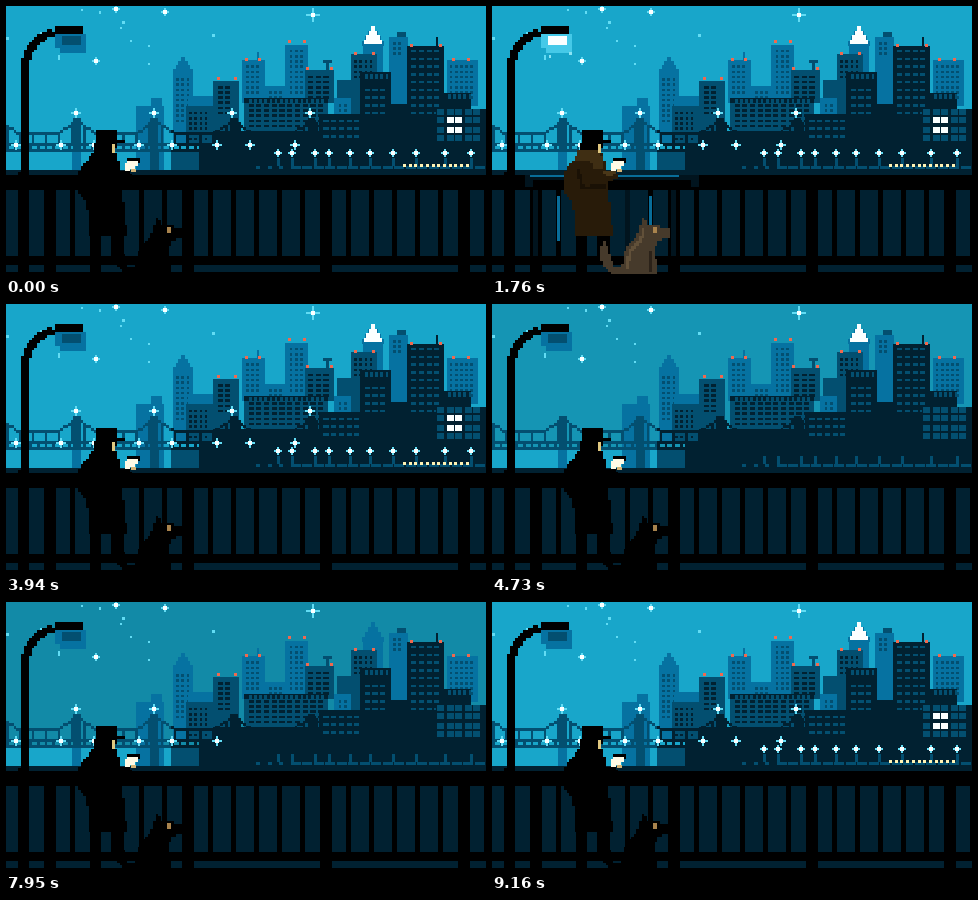
These frames come from a looping animation (480x270 px, 9320 ms). An HTML page:

```html
<!DOCTYPE html>
<html lang="en">
<head>
<meta charset="utf-8">
<title>Night city</title>
<style>
html, body { margin: 0; width: 100%; height: 100%; overflow: hidden; background: #000; }
svg { display: block; width: 100vw; height: 100vh; }
</style>
</head>
<body>
<svg id="stage" viewBox="0 0 480 270" shape-rendering="crispEdges"></svg>
<script>
const LOOP = 9320, PX = 2.58;
const SKY = ['#18a6ca', '#1595b4', '#128aa7'];
const WATER = '#18a6ca', FAR = '#0672a1', MID = '#034f70', NEAR = '#012131', INK = '#000';
const WHITE = '#fbffff', CREAM = '#fff3b4', GOLD = '#e3cf80', CYAN = '#62dcf4', RED = '#f0694f';

const stage = document.getElementById('stage');
const lights = [];
let seed = 11;
const random = () => (seed = seed * 16807 % 2147483647) / 2147483647;
const range = (n, f) => Array.from({ length: n }, (_, i) => f(i));
const snap = v => Math.round(v / PX) * PX;

function add(tag, attrs, parent = stage) {
  const el = document.createElementNS('http://www.w3.org/2000/svg', tag);
  for (const k in attrs) el.setAttribute(k, attrs[k]);
  parent.appendChild(el);
  return el;
}
const group = () => add('g', {});
const rect = (fill, x, y, width, height, parent) =>
  add('rect', { fill, x, y, width, height }, parent);

// Fills a polygon in rows of coarse pixels.
function blob(fill, points, parent) {
  const pts = points.split(' ').map(p => p.split(',').map(Number));
  let d = '';
  for (let y = 0; y < 270; y += PX) {
    const mid = y + PX / 2, cuts = [];
    pts.forEach(([x1, y1], i) => {
      const [x2, y2] = pts[(i + 1) % pts.length];
      if (y1 > mid !== y2 > mid) cuts.push(snap(x1 + (mid - y1) / (y2 - y1) * (x2 - x1)));
    });
    cuts.sort((a, b) => a - b);
    for (let i = 0; i + 1 < cuts.length; i += 2) d += `M${cuts[i]} ${y}H${cuts[i + 1]}v${PX}H${cuts[i]}Z`;
  }
  return add('path', { fill, d }, parent);
}

// A part that goes dark at "off" and comes back at "on".
function light(on, off) {
  const el = group();
  lights.push({ el, on, off });
  return el;
}

function cross(x, y, r, parent) {
  rect(CYAN, x - r, y - 1, 2 * r, 2, parent);
  rect(CYAN, x - 1, y - r, 2, 2 * r, parent);
  rect(WHITE, x - 2, y - 2, 4, 4, parent);
}

// Sky
const sky = rect(SKY[0], 0, 0, 480, 165);
range(12, () => rect(CYAN, snap(random() * 240), snap(random() * 70), PX, PX));
cross(110, 3, 4);
cross(159, 6, 4);
cross(90, 55, 4);
cross(307, 9, 7);
rect(WATER, 0, 146, 193, 18);

// Buildings
const SMALL = { dx: 5.16, dy: 5.16, w: PX, h: PX };
const WIDE = { dx: 7.74, dy: 7.74, w: 5.16, h: PX };
const LOW = { ...WIDE, dy: 5.16 };

function windows(x, y, cols, rows, style, dark, on, off, share = 0.55) {
  const lit = light(on, off);
  for (let j = 0; j < rows; j++) {
    const warm = random() < 0.5 ? CREAM : GOLD;
    for (let i = 0; i < cols; i++) {
      const cell = [snap(x + i * style.dx), snap(y + j * style.dy), style.w, style.h];
      rect(dark, ...cell);
      if (random() < share) rect(random() < 0.4 ? WHITE : warm, ...cell, lit);
    }
  }
}

function tower(color, x, y, w, bottom, style, rows = 0, off = 4040 + x * 1.4) {
  rect(color, x, y, w, bottom - y);
  if (!style) return;
  const on = (color === FAR ? 8820 : 8100) + x * 0.75;
  windows(x + 4, y + 5, Math.floor((w - 4) / style.dx), rows, style, color === MID ? NEAR : MID, on, off);
}

// Centred steps that widen downwards.
function crown(color, cx, top, steps, grow, h, parent) {
  range(steps, i => rect(color, cx - 2 - i * grow, top + i * h, 4 + 2 * i * grow, h, parent));
}
const beacons = (y, ...xs) => xs.forEach(x => rect(RED, x, y, 3, 3));
const slots = (color, x, y, n) => range(n, i => rect(color, x + i * 5.16, y, PX, 5));

tower(FAR, 130, 100, 28, 164);
tower(FAR, 145, 92, 11, 100);
crown(FAR, 177, 51, 4, 2.6, 4);
tower(FAR, 167, 66, 20, 138, SMALL, 9, 4890);
tower(FAR, 182, 90, 25, 138);
tower(FAR, 236, 54, 23, 97, SMALL, 6, 4890);
rect(FAR, 251, 46, 2, 8);
tower(FAR, 259, 80, 27, 97, SMALL, 2);
tower(FAR, 279, 39, 23, 97, SMALL, 9);
tower(FAR, 328, 92, 18, 112, SMALL, 2);
crown(FAR, 367, 20, 4, 3, 5);
tower(FAR, 357, 38, 20, 70);
tower(FAR, 383, 31, 19, 100, SMALL, 3, 5050);
tower(FAR, 441, 54, 31, 100, SMALL, 7);
rect(MID, 391, 26, 9, 5);
tower(MID, 165, 146, 28, 164);
tower(MID, 180, 100, 28, 138, SMALL, 6);
tower(MID, 207, 75, 26, 138, LOW, 6);
tower(MID, 299, 64, 29, 97, LOW, 5);
rect(MID, 317, 54, 9, 3);
rect(MID, 320, 57, 3, 7);
tower(MID, 331, 74, 26, 92, SMALL, 0);
tower(MID, 345, 48, 26, 110, SMALL, 4, 5210);
tower(MID, 238, 92, 84, 128, LOW, 5);
rect(NEAR, 238, 92, 84, 5);
slots(MID, 243, 93, 15);
rect(NEAR, 193, 137, 287, 27);
tower(NEAR, 207, 125, 110, 138);
tower(NEAR, 313, 108, 44, 164, WIDE, 3);
tower(NEAR, 354, 66, 31, 164);
slots(MID, 359, 68, 5);
windows(358, 82, 3, 4, WIDE, MID, 8280, 4640);
tower(NEAR, 383, 98, 57, 164);
tower(NEAR, 401, 40, 37, 164, WIDE, 9);
rect(NEAR, 430, 31, 2, 9);
tower(NEAR, 438, 87, 27, 104);
slots(MID, 442, 88, 5);
tower(NEAR, 430, 103, 50, 164);
windows(432, 103, 5, 4, { dx: 9, dy: 9, w: 7, h: 6 }, MID, 8340, 4730, 0);
const block = light(8340, 4730);
range(4, i => rect(WHITE, snap(441 + i % 2 * 9), snap(112 + (i >> 1) * 9), 7, 6, block));
beacons(34, 282, 297);
beacons(38, 404, 433);
beacons(46, 348, 366);
beacons(52, 239, 252, 446, 461);
beacons(61, 300, 324);
beacons(71, 211, 228);
crown(WHITE, 367, 20, 4, 2.4, 4.5, light(8660, 5370));

// Bridge
const SPAN = 78, FIRST = 70;
function bridge(color, from, to) {
  for (let x = from; x < to; x += PX) {
    const gap = Math.abs((x - FIRST + SPAN * 2.5) % SPAN - SPAN / 2);
    const top = gap < 4 ? 112 : snap(Math.min(127, 113 + gap * 0.7));
    rect(color, x, top, PX, gap < 4 ? 34 : 3);
    if (Math.round(x / PX) % 5 === 0) rect(color, x, top, PX, 137 - top);
  }
  rect(color, from, 137, to - from, 3);
  rect(color, from, 143, to - from, 3);
  for (let x = from; x < to; x += 3 * PX) rect(color, x, 140, PX, 3);
}
rect(FAR, 66, 146, 9, 18);
rect(MID, 144, 146, 9, 18);
bridge(MID, 0, 165);
bridge(NEAR, 165, 310);
range(4, i => {
  const x = FIRST + i * SPAN;
  cross(x, 107, 5, light(7800 + i * 80, 4100 + i * 110));
  cross(x - SPAN + 18, 139, 5, light(i ? 7750 + i * 70 : 7610, 4040 + i * 150));
  cross(x - 15, 139, 5, light(7770 + i * 70, 4090 + i * 150));
});

// Waterfront
range(20, i => rect(MID, 250 + i * 11.5, 160, i < 3 ? 4 : 10, 3));
[272, 286, 309, 323, 344, 364, 387, 410, 439, 465].forEach((x, i) => {
  rect(MID, x - 1, 152, 3, 8);
  cross(x, 147, 4, light((i < 6 ? 8050 : 8300) + i * 60, 4140 + i * 50));
});
const quay = light(9000, 4240);
range(12, i => rect(CREAM, 397 + i * 5.7, 158, 3, 3, quay));

// Railing: a thick post after every five thin bars
rect(NEAR, 0, 164, 480, 106);
const rails = [[169, 15], [250, 9], [266, 4]];
const BAR = 23;
rails.forEach(([y, h]) => rect(INK, 0, y, 480, h));
range(21, i => {
  const thick = i % 6 === 1;
  rect(INK, 20.5 + i * BAR - (thick ? 6 : 2.6), 184, thick ? 12 : 5.2, thick ? 86 : 70);
});
const glow = group();
rect('#01141e', 33, 169, 174, 12, glow);
rect(INK, 41, 174, 158, 7, glow);
rect('#086d99', 38, 169, 149, 2, glow);
range(4, i => {
  rect('#01141e', 41 + i * 2 * BAR, 184, 5, 66, glow);
  if (i % 2) rect('#086d99', 19 + i * 2 * BAR, 190, PX, 45, glow);
});

// Street lamp
const arc = (r, from, to) => range(25, i => {
  const a = Math.PI * (from + (to - from) * i / 24);
  return `${57 + r * Math.cos(a)},${63 + r * Math.sin(a)}`;
}).join(' ');
const arm = (r1, r2) => `${arc(r1, 1, 1.42)} ${arc(r2, 1.42, 1)}`;
blob(INK, arm(42, 34));
rect(INK, 15, 58, 8, 126);
rect(INK, 12, 166, 11, 104);
rect(INK, 49, 20, 28, 8);

function glass(outer, inner) {
  const el = group();
  rect(outer, 49, 28, 31, 14, el);
  rect(outer, 54, 42, 26, 5, el);
  rect(inner, 56, 30, 19, 9, el);
  return el;
}
const glassOff = glass(FAR, MID), glassOn = glass('#45c9e8', WHITE);
blob('#d8fbff', arm(37, 34), glow);
rect('#d8fbff', 20, 60, 3, 28, glow);
rect('#087aa6', 20, 88, 3, 77, glow);
rect('#04384f', 20, 184, 3, 54, glow);
rect('#032a3d', 15, 60, 3, 110, glow);
const moths = range(2, () => rect(MID, 0, 0, PX, PX));

// Man
blob(INK, '90,124 110,124 112,133 118,134 118,138 110,138 109,147 87,147 87,138 90,136');
rect(INK, 84, 228, 11, 40);
rect(INK, 105, 228, 13, 30);
const coat = blob(INK, '86,146 109,146 112,155 114,164 124,165 126,172 117,176 117,192 121,229 82,229 81,194 73,188 72,170 77,158 82,153');
const litMan = group();
blob('#3f2e13', '86,145 109,145 112,163 103,163 98,155 82,155', litMan);
blob('#1a1105', '85,163 88,163 92,180 113,178 113,183 88,184', litMan);
blob('#4a3718', '112,166 121,164 124,168 114,171', litMan);
rect('#e0c880', 106, 138, 3, 9);
const phone = group();
blob(INK, '123,152 135,152 135,157 126,163 120,160', phone);
blob('#fffbe6', '122,154 133,154 129,163 118,165 118,160', phone);
rect('#d5b476', 125, 163, 5, 3, phone);

// Dog
const dog = blob(INK, '149,218 151,211 155,218 165,219 168,222 178,223 178,232 167,234 163,242 165,268 120,268 109,256 109,240 113,234 117,246 121,259 130,262 131,246 140,236 146,228');
const litDog = group();
blob('#615039', '150,222 153,222 150,235 140,246 137,262 134,262 136,246 147,234', litDog);
blob('#2b2219', '158,244 161,244 161,267 158,267', litDog);
const eye = rect('#a8834d', 161, 221, 4, 6);

const flicker = [100, 160, 460, 520, 660, 3160, 3220, 3460, 3520, 3620];
const show = (el, on) => el.setAttribute('visibility', on ? 'visible' : 'hidden');
const within = (t, a, b) => t >= a && t < b;

function skyLevel(t) {
  if (t < 4340 || t >= 8820) return 0;
  return within(t, 5370, 8100) ? 2 : 1;
}

function draw(t) {
  sky.setAttribute('fill', SKY[skyLevel(t)]);
  for (const { el, on, off } of lights) show(el, t < off || t >= on);

  const lit = flicker.filter(s => s <= t).length % 2 === 1;
  [glow, glassOn, litMan, litDog].forEach(el => show(el, lit));
  show(glassOff, !lit);
  coat.setAttribute('fill', lit ? '#281b09' : INK);
  dog.setAttribute('fill', lit ? '#463a2b' : INK);

  const step = Math.floor((t - 60) / 100);
  moths.forEach((moth, i) => {
    const a = step * (i ? 0.9 : -0.7) + i * 2;
    moth.setAttribute('x', snap((i ? 77 : 53) + 5 * Math.cos(a)));
    moth.setAttribute('y', snap((i ? 48 : 51) + 3 * Math.sin(a * 1.3)));
    moth.setAttribute('fill', lit ? '#8be4f4' : MID);
    show(moth, within(t, 660, 3940));
  });

  phone.setAttribute('transform', `translate(0 ${within(t, 2360, 2660) ? PX : 0})`);
  eye.setAttribute('fill', within(t, 3060, 3940) ? '#38a9cc' : '#a8834d');
  show(eye, !within(t, 6260, 6360) && !within(t, 6520, 6620));
}

const start = performance.now();
function tick() {
  draw((performance.now() - start) % LOOP);
  requestAnimationFrame(tick);
}
tick();
</script>
</body>
</html>
```
